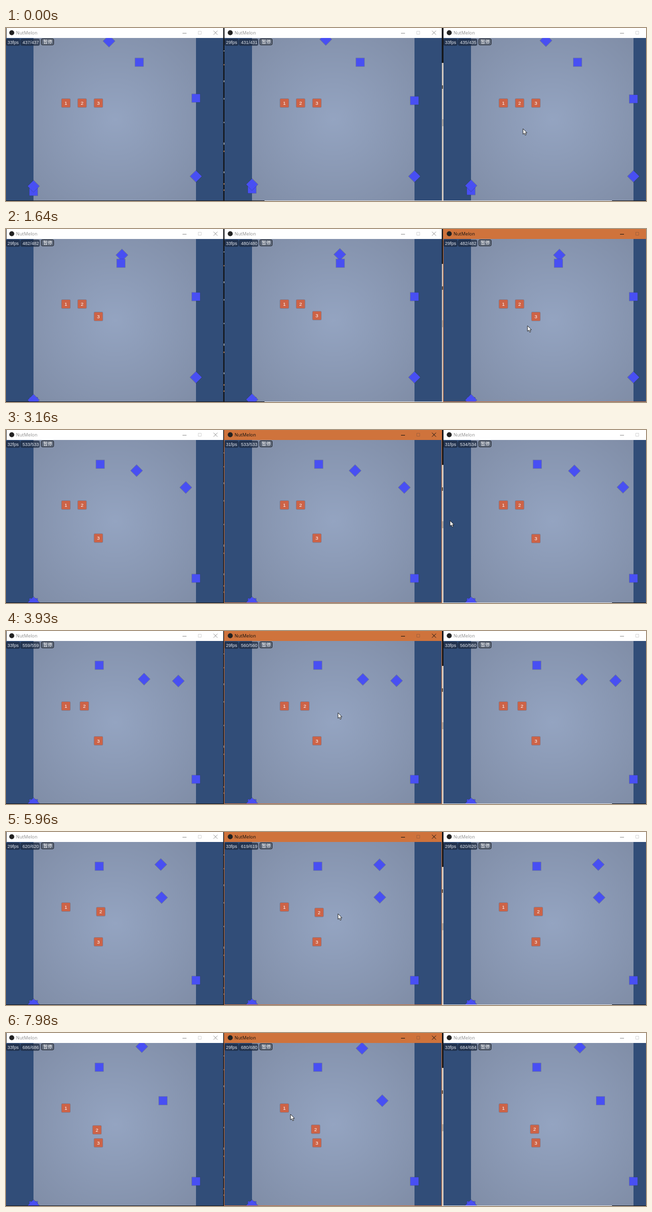
An HTML page for the animation above (8 s loop, 1280 by 347 pixels).

```html
<!DOCTYPE html>
<html lang="en">
<head>
<meta charset="utf-8">
<title>Lockstep clients</title>
<style>
html, body { margin: 0; width: 100%; height: 100%; overflow: hidden; background: #14161a; }
svg { display: block; width: 1280px; height: 347px; }
.title { font: 9.2px "Open Sans", "Noto Sans", sans-serif; }
.hud { font: 9.1px "Liberation Sans", Arial, sans-serif; fill: #e2e7ee; }
.cjk { font: 9px "Noto Sans CJK SC", "Noto Sans CJK", sans-serif; fill: #fff; }
.num { font: 9.8px "Liberation Sans", Arial, sans-serif; fill: #fff; text-anchor: middle; }
</style>
</head>
<body>
<svg id="stage" viewBox="0 0 1280 347">
  <defs>
    <radialGradient id="shade" gradientUnits="userSpaceOnUse" cx="218" cy="183" r="250">
      <stop offset="0" stop-color="#94a4c1"/>
      <stop offset="1" stop-color="#7e8ba4"/>
    </radialGradient>
    <clipPath id="view"><rect y="20" width="434.5" height="326"/></clipPath>
  </defs>
</svg>
<script>
const LOOP = 8000;
const STEP = 78.5;
const SPEED = 0.813; // pixels per tick
const DIAGONAL = SPEED / Math.SQRT2;
const BLUE = '#484ff3';
const RED = '#cd6347';
const ORANGE = '#cf733c';
const SIDE = '#314d78';

// Shared game clock: time, tick
const CLOCK = [[0, 437], [860, 460], [2360, 506], [3930, 559], [5170, 595], [6890, 649], [7980, 686]];

// lead and lag set how far a client runs from the shared clock, go is when tile 2 leaves
const CLIENTS = [
  { x: 0, lead: 0, lag: 0, go: 553.5, phase: 0.6 },
  { x: 437, lead: 1.2, lag: 7.4, go: 549.6, phase: 3.3 },
  { x: 875, lead: 1.4, lag: 3.4, go: 554, phase: 0.15 },
];

// Pointer moves: start, end, destination
const POINTER_HOME = [1034, 202];
const POINTER_MOVES = [[200, 480, 1043, 194], [2750, 3650, 664, 164], [7600, 7900, 569, 163]];

const stage = document.getElementById('stage');
const clamp = (v, low, high) => Math.min(high, Math.max(low, v));
const mix = (a, b, k) => a + (b - a) * k;

function add(parent, tag, attrs, text) {
  const node = document.createElementNS('http://www.w3.org/2000/svg', tag);
  for (const key in attrs) node.setAttribute(key, attrs[key]);
  if (text !== undefined) node.textContent = text;
  return parent.appendChild(node);
}
const box = (parent, x, y, width, height, fill, more) =>
  add(parent, 'rect', { x, y, width, height, fill, ...more });
const label = (parent, x, y, cls, text) => add(parent, 'text', { x, y, class: cls }, text);
const set = (node, key, value) => node.setAttribute(key, value);
const place = (node, x, y, turn = 0) =>
  set(node, 'transform', `translate(${x.toFixed(2)} ${y.toFixed(2)}) rotate(${turn})`);

function seeded(seed) {
  return () => (seed = seed * 16807 % 2147483647) / 2147483647;
}

// Time and shared tick, advancing in even steps between two clock points
function readClock(t) {
  const next = Math.max(1, CLOCK.findIndex(([time]) => time > t));
  const i = t >= CLOCK[CLOCK.length - 1][0] ? CLOCK.length - 1 : next;
  const [from, a] = CLOCK[i - 1], [to, b] = CLOCK[i];
  const steps = Math.round((to - from) / STEP);
  const k = clamp(Math.floor((t - from) / (to - from) * steps + 1e-6) / steps, 0, 1);
  return { time: mix(from, to, k), tick: mix(a, b, k) };
}

function clientTick(c, time, tick) {
  const u = 2 * time / LOOP - 1;
  return Math.round(tick + (c.lag && c.lead - c.lag * u * u));
}

function clientFps(c, time) {
  const second = Math.floor((time + 500) / 1000);
  return Math.round(31 + 2.4 * Math.cos(1.5 * second + c.phase));
}

function drawDesktop() {
  box(stage, 0, 0, 1280, 347, '#14161a');
  const random = seeded(11);
  for (let y = 45; y < 340; y += 12 + 50 * random()) {
    box(stage, 435, y, 2, 2 + 3 * random(), random() < .5 ? '#8a8f94' : '#a8774f');
  }
  box(stage, 871.5, 70, 3.5, 277, '#d3cbc4');
  box(stage, 871.5, 183, 3.5, 14, '#aaa49e');
  box(stage, 872, 115, 2, 7, '#4a4642');
  box(stage, 517, 346, 695, 1, '#e4e2e0');
}

function makeBlock(parent, size, fill, rx) {
  const g = add(parent, 'g', {});
  box(g, -size / 2, -size / 2, size, size, fill,
    { rx, stroke: '#28324d', 'stroke-opacity': .3, 'stroke-width': 1.6, 'paint-order': 'stroke' });
  return g;
}

function makeClient(client) {
  const root = add(stage, 'g', { transform: `translate(${client.x} 0)` });
  const scene = add(root, 'g', { 'clip-path': 'url(#view)' });
  box(scene, 0, 20, 435, 326, SIDE);
  box(scene, 55, 20, 325, 326, 'url(#shade)');

  const blocks = Array.from({ length: 6 }, () => makeBlock(scene, 16.4, BLUE, 0));
  const tiles = [1, 2, 3].map(n => {
    const tile = makeBlock(scene, 17, RED, 1.5);
    label(tile, 0, 3.5, 'num', n);
    return tile;
  });

  const pill = { rx: 2.5, 'fill-opacity': .72, stroke: '#16202f', 'stroke-opacity': .6 };
  box(root, .5, 22, 27, 13, '#1e2b42', pill);
  box(root, 29.5, 22, 37.5, 13, '#1e2b42', pill);
  box(root, 70.5, 21.5, 25, 12.5, '#525a68', { ...pill, stroke: '#20242b', 'stroke-opacity': 1 });
  const fps = label(root, 3, 31.5, 'hud');
  const count = label(root, 33, 31.5, 'hud');
  label(root, 74.5, 31, 'cjk', '暂停');

  const bar = box(root, client.x ? 0 : 1, 0, client.x ? 434.5 : 433.5, 20, '#fff');
  const border = box(root, -.5, .5, 435, 346, 'none', { stroke: ORANGE });
  add(root, 'circle', { cx: 11.5, cy: 9.5, r: 5, fill: '#222' });
  const title = label(root, 20, 13, 'title', 'NutMelon');
  const line = d => add(root, 'path', { d, fill: 'none' });
  const buttons = [line('M353 10.5h8'), line('M415 5.5l8 8m0-8l-8 8')];
  const maximise = line('M384.5 6.5h6v6h-6z');
  return { ...client, border, blocks, tiles, fps, count, bar, title, buttons, maximise };
}

function updateBlocks(c, n) {
  const played = n - 437;
  const gone = Math.min(played * DIAGONAL, 109.5);
  const climb = Math.max(0, (n - 497.5) * DIAGONAL);
  const landed = n >= 681;
  const poses = [
    [landed ? 314 : 206 + gone, 26.3 + gone, landed ? 0 : 45],
    [Math.max(186.5, 266.5 - played * SPEED), 68.7, 0],
    [380 - climb, Math.max(135.7, 140.7 - played * SPEED) - climb, climb ? 45 : 0],
    [380, 297.5, n < 522 ? 45 : 0],
    [55, Math.min(346, 328 + played * SPEED), 0],
    [55, Math.min(346, 317.3 + played * DIAGONAL), 45],
  ];
  poses.forEach((pose, i) => place(c.blocks[i], ...pose));

  // Tile 2 runs right, then turns down with a slight drift back
  const run = clamp(n - c.go, 0, 48.5);
  const drop = Math.max(0, n - c.go - 48.5);
  place(c.tiles[0], 119.8, 150.5);
  place(c.tiles[1], 152.2 + run * SPEED - drop * .115, 150.5 + drop * .52);
  place(c.tiles[2], 184.8, clamp(150.5 + (n - 451.4) * SPEED, 150.5, 220.2));
}

function updateChrome(c, focused) {
  set(c.bar, 'fill', focused ? ORANGE : '#fff');
  set(c.title, 'fill', focused ? '#111' : '#8c8c8c');
  set(c.border, 'opacity', focused ? 1 : 0);
  c.buttons.forEach(b => set(b, 'stroke', focused ? '#111' : '#8c8c8c'));
  set(c.maximise, 'stroke', focused ? '#a5613a' : '#d4d4d4');
}

function pointerAt(t) {
  return POINTER_MOVES.reduce(([x, y], [start, end, toX, toY]) => {
    const k = clamp((t - start) / (end - start), 0, 1);
    const eased = k * k * (3 - 2 * k);
    return [mix(x, toX, eased), mix(y, toY, eased)];
  }, POINTER_HOME);
}

drawDesktop();
const clients = CLIENTS.map(makeClient);
const pointer = add(stage, 'path', {
  d: 'M0 0V11.2L2.6 8.8L4.5 13L6.4 12.1L4.6 8.2H8Z',
  fill: '#fff', stroke: '#111', 'stroke-width': .9,
});

function render(t) {
  const { time, tick } = readClock(t);
  const focus = time < 500 ? -1 : time < 3050 ? 2 : 1;
  clients.forEach((c, i) => {
    const n = clientTick(c, time, tick);
    c.fps.textContent = `${clientFps(c, time)}fps`;
    c.count.textContent = `${n}/${n}`;
    updateBlocks(c, n);
    updateChrome(c, i === focus);
  });
  place(pointer, ...pointerAt(time));
}

const begin = performance.now();
function frame() {
  render((performance.now() - begin) % LOOP);
  requestAnimationFrame(frame);
}
frame();
</script>
</body>
</html>
```
